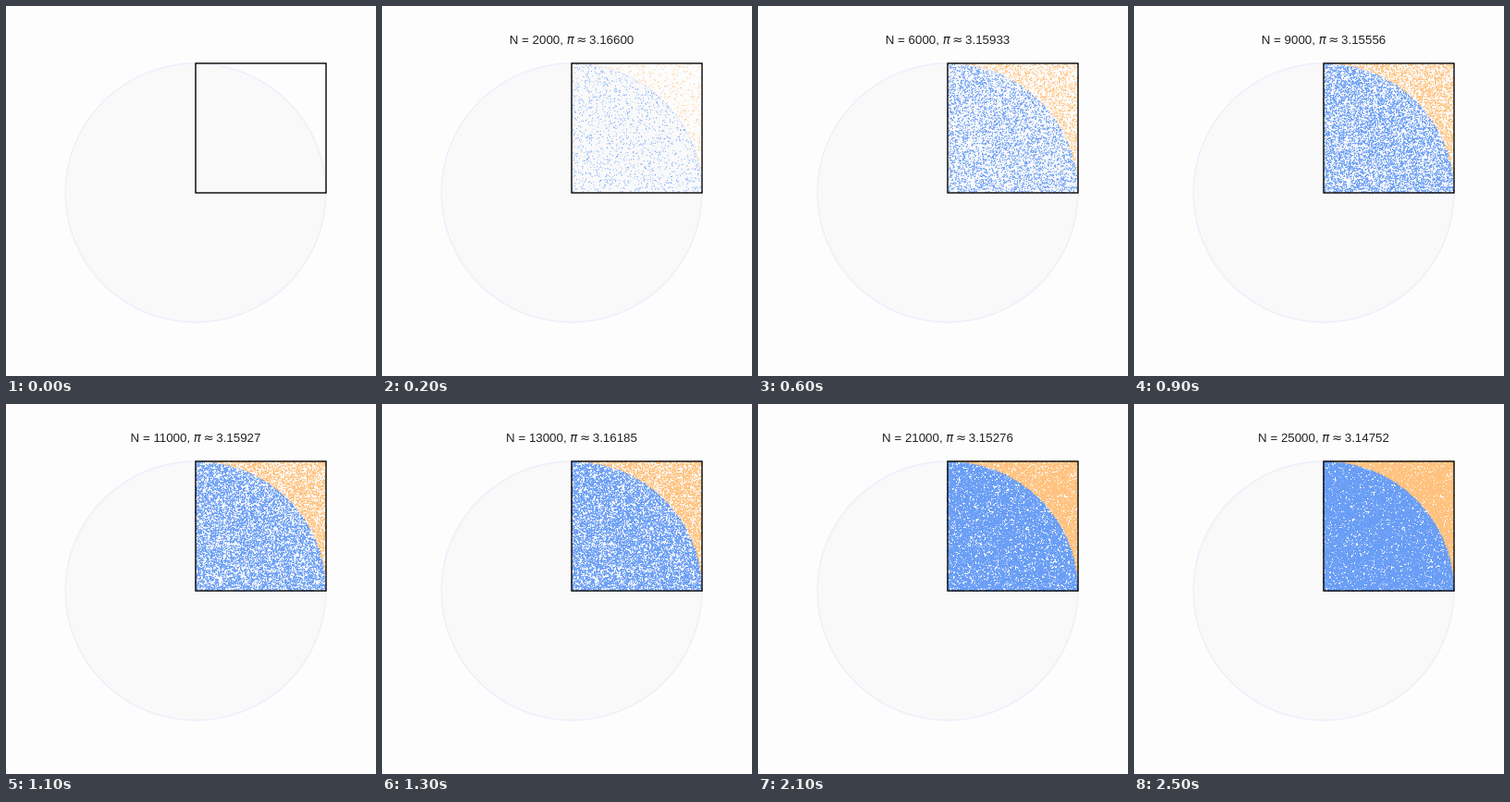
Recreate the animation shown at these times as an HTML page with a canvas. Size 400 px wide and 400 px high, loop 2600 ms.

```html
<!DOCTYPE html>
<html lang="en">
<head>
<meta charset="utf-8">
<title>Monte Carlo estimate of pi</title>
<style>
  html, body { margin: 0; width: 100%; height: 100%; overflow: hidden; background: #fdfdfd; }
  svg, canvas { position: absolute; left: 0; top: 0; width: 400px; height: 400px; }
  text { font: 13.33px "Liberation Sans", Arial, sans-serif; fill: #222; text-anchor: middle; }
  .math { font-family: "DejaVu Sans", sans-serif; }
  .pi { font-style: oblique; }
</style>
</head>
<body>
<svg viewBox="0 0 400 400">
  <ellipse cx="205" cy="202" rx="140.9" ry="140" fill="#f9f9fa" stroke="#ebeffb" stroke-width="1.39"/>
</svg>
<canvas id="dots" width="400" height="400"></canvas>
<svg viewBox="0 0 400 400">
  <rect x="205" y="62" width="141" height="140" fill="none" stroke="#000" stroke-width="1.39"/>
  <text id="title" x="205" y="41">N = <tspan id="count"></tspan>, <tspan class="math pi">π</tspan><tspan class="math" dx="2.6">≈</tspan><tspan id="value" dx="2.6"></tspan></text>
</svg>
<script>
  const LOOP = 2600, STEP = 100, BATCH = 1000, BATCHES = 25;
  const CX = 205, CY = 202, RX = 140.9, RY = 140, DOT = 0.74;
  const BLUE = '#6b9ef4', ORANGE = '#ffc07f';
  const $ = id => document.getElementById(id);
  const ctx = $('dots').getContext('2d');

  // [batches, points inside the circle]
  const hits = [[0, 0], [4, 3165], [9, 7100], [13, 10276], [17, 13439], [21, 16552], [25, 19672]];

  function inside(k) {
    const i = Math.max(1, hits.findIndex(h => h[0] >= k));
    const [k0, n0] = hits[i - 1], [k1, n1] = hits[i];
    return Math.round(n0 + (n1 - n0) * (k - k0) / (k1 - k0));
  }

  let seed = 31415;
  function random() {
    seed = (seed + 0x6D2B79F5) | 0;
    let t = Math.imul(seed ^ (seed >>> 15), 1 | seed);
    t = (t + Math.imul(t ^ (t >>> 7), 61 | t)) ^ t;
    return ((t ^ (t >>> 14)) >>> 0) / 4294967296;
  }

  // Uniform point in the unit square, on the wanted side of the arc
  function sample(hit) {
    let x, y;
    do { x = random(); y = random(); } while ((x * x + y * y < 1) !== hit);
    return { x: CX + RX * x - DOT / 2, y: CY - RY * y - DOT / 2, color: hit ? BLUE : ORANGE };
  }

  const points = [];
  for (let k = 1; k <= BATCHES; k++) {
    let need = inside(k) - inside(k - 1);
    for (let left = BATCH; left > 0; left--) {
      const hit = random() < need / left;
      if (hit) need--;
      points.push(sample(hit));
    }
  }

  // Each step repaints every point so far, so the soft dots build up
  function paint(count) {
    for (let i = 0; i < count; i++) {
      const p = points[i];
      ctx.fillStyle = p.color;
      ctx.fillRect(p.x, p.y, DOT, DOT);
    }
  }

  let shown = -1;
  function show(step) {
    if (step === shown) return;
    if (step < shown || shown < 0) {
      ctx.clearRect(0, 0, 400, 400);
      shown = 0;
    }
    while (shown < step) paint(++shown * BATCH);
    const n = step * BATCH;
    $('title').style.visibility = n ? 'visible' : 'hidden';
    $('count').textContent = n;
    $('value').textContent = n ? (4 * inside(step) / n).toFixed(5) : '';
  }

  const start = performance.now();
  function frame() {
    show(Math.floor((performance.now() - start) % LOOP / STEP));
    requestAnimationFrame(frame);
  }
  frame();
</script>
</body>
</html>
```
